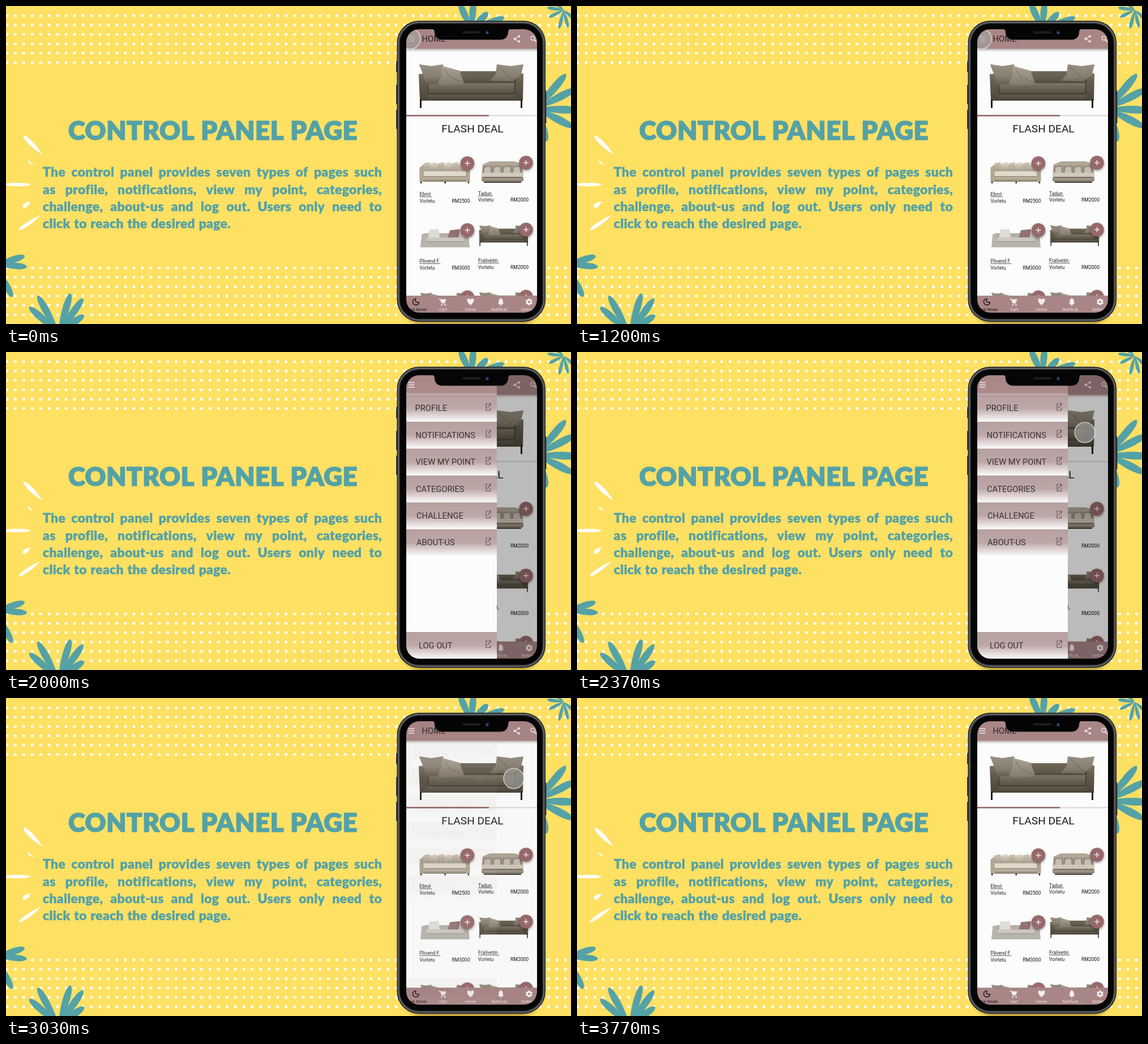
Write an HTML page with a canvas that moves like this. It is 998 by 561 pixels and loops after 3.81 s.

```html
<!DOCTYPE html>
<html lang="en">
<head>
<meta charset="utf-8">
<title>Control panel page</title>
<style>
html, body { margin: 0; width: 100%; height: 100%; overflow: hidden; background: #fee063; }
canvas { display: block; width: 998px; height: 561px; }
</style>
</head>
<body>
<canvas id="stage" width="998" height="561"></canvas>
<script>
const W = 998, H = 561, LOOP = 3810;
const SCREEN = { x: 707, y: 41, w: 231, h: 500, r: 23 };
const TEAL = '#54a2a6', MAUVE = '#a98686', PLUM = '#98696b';
const view = document.getElementById('stage').getContext('2d');

function layer(paint) {
  const c = document.createElement('canvas');
  c.width = W;
  c.height = H;
  paint(c.getContext('2d'));
  return c;
}

function box(g, x, y, w, h, r, fill) {
  g.beginPath();
  g.roundRect(x, y, w, h, r);
  g.fillStyle = fill;
  g.fill();
}

function disc(g, x, y, r, fill) {
  g.beginPath();
  g.arc(x, y, r, 0, Math.PI * 2);
  g.fillStyle = fill;
  g.fill();
}

function poly(g, fill, ...p) {
  g.beginPath();
  for (let i = 0; i < p.length; i += 2) g.lineTo(p[i], p[i + 1]);
  g.closePath();
  g.fillStyle = g.strokeStyle = fill;
  g.lineWidth = 2;
  g.lineJoin = 'round';
  g.fill();
  g.stroke();
}

function line(g, color, width, ...p) {
  g.beginPath();
  for (let i = 0; i < p.length; i += 2) g.lineTo(p[i], p[i + 1]);
  g.strokeStyle = color;
  g.lineWidth = width;
  g.stroke();
}

function label(g, str, x, y, font, color, align = 'left') {
  g.font = font;
  g.textAlign = align;
  g.fillStyle = color;
  g.fillText(str, x, y);
}

function fade(g, y0, y1, ...stops) {
  const grad = g.createLinearGradient(0, y0, 0, y1);
  for (let i = 0; i < stops.length; i += 2) grad.addColorStop(stops[i], stops[i + 1]);
  return grad;
}

// Thin at the base, round at the tip.
function petal(g, fill, x, y, tipX, tipY, w) {
  const len = Math.hypot(tipX - x, tipY - y);
  g.save();
  g.translate(x, y);
  g.rotate(Math.atan2(tipY - y, tipX - x));
  g.beginPath();
  g.moveTo(0, 0);
  g.bezierCurveTo(len * .4, -w * .7, len * .96, -w * .75, len, 0);
  g.bezierCurveTo(len * .96, w * .75, len * .4, w * .7, 0, 0);
  g.fillStyle = fill;
  g.fill();
  g.restore();
}

function flower(g, x, y, w, ...tips) {
  for (let i = 0; i < tips.length; i += 2) petal(g, TEAL, x, y, tips[i], tips[i + 1], w);
}

function roundText(g, str, x, y, font, edge) {
  label(g, str, x, y, font, TEAL);
  g.strokeStyle = TEAL;
  g.lineWidth = edge;
  g.lineJoin = 'round';
  g.strokeText(str, x, y);
}

function justify(g, str, x, y, width, font) {
  const words = str.split(' ');
  g.font = font;
  const sizes = words.map(w => g.measureText(w).width);
  const gap = (width - sizes.reduce((a, b) => a + b)) / (words.length - 1);
  words.forEach((w, i) => {
    roundText(g, w, x, y, font, .4);
    x += sizes[i] + gap;
  });
}

function drawBackdrop(g) {
  g.fillStyle = '#fee063';
  g.fillRect(0, 0, W, H);
  for (const top of [17, 462])
    for (let row = 0; row < 6; row++)
      for (let x = 1.5; x < W; x += 14.95) disc(g, x, top + row * 16.5, 2.6, '#fffdf4');

  flower(g, -16, 456, 10.5, 33, 441, 37, 460);
  flower(g, -12, 468, 10.5, 11, 513);
  flower(g, 93, 577, 11.5, 41, 531, 56, 511, 114, 507, 136, 516, 138, 545);
  flower(g, 985, 7, 5.5, 956, 3, 959, 20, 977, 40, 993, 38, 1006, 25, 968, -8);
  flower(g, 822, 42, 11, 801, -5, 826, -8, 851, 11, 880, 20);
  flower(g, 938, 181, 12.5, 989, 120, 1006, 146, 1012, 184, 1002, 214, 955, 239);

  petal(g, '#fff', 64, 262, 31, 229, 7);
  petal(g, '#fff', 48, 281, 38, 273, 2.5);
  petal(g, '#fff', -16, 315, 43, 315, 5.5);
  petal(g, '#fff', 43, 345, 30, 355, 7);
  petal(g, '#fff', 61, 369, 23, 395, 6);

  g.letterSpacing = '0.6px';
  roundText(g, 'CONTROL PANEL PAGE', 110, 236, '900 45.4px Lato, sans-serif', 1.6);
  g.letterSpacing = '0.3px';
  const font = '900 22.9px Lato, sans-serif';
  justify(g, 'The control panel provides seven types of pages such', 65, 301, 599, font);
  justify(g, 'as profile, notifications, view my point, categories,', 65, 332, 599, font);
  justify(g, 'challenge, about-us and log out. Users only need to', 65, 362, 599, font);
  justify(g, 'click to reach the desired page.', 65, 392, 332, font);
}

function drawPhone(g) {
  g.save();
  g.shadowColor = 'rgba(70,50,0,.45)';
  g.shadowBlur = 6;
  g.shadowOffsetY = 4;
  box(g, 699, 44, 246, 513, 36, '#222');
  g.restore();
  for (const [y, h] of [[97, 20], [139, 34], [183, 34]]) box(g, 689, y, 4, h, 1, '#3b3b3d');
  box(g, 951, 149, 3.5, 58, 1, '#3b3b3d');
  box(g, 690.5, 26, 262.5, 531, 39, '#1f2022');
  box(g, 692.3, 27.8, 258.9, 527.4, 37.2, '#77787b');
  box(g, 693.7, 29.2, 256.1, 524.6, 35.8, '#3c3d40');
  box(g, 695.8, 31.3, 251.9, 520.4, 33.7, '#050506');
}

function drawNotch(g) {
  g.beginPath();
  g.moveTo(750, 40);
  g.quadraticCurveTo(757, 40, 757, 46);
  g.arcTo(757, 59.5, 772, 59.5, 13);
  g.arcTo(887, 59.5, 887, 46, 13);
  g.lineTo(887, 46);
  g.quadraticCurveTo(887, 40, 894, 40);
  g.closePath();
  g.fillStyle = '#050506';
  g.fill();
  box(g, 806, 44.5, 32, 4, 2, '#1d1e20');
  disc(g, 850, 47, 3.4, '#15253c');
  disc(g, 850, 47, 1.6, '#37629a');
}

// Sofas are drawn on a 186 x 80 grid and scaled into place.
function sofa(g, x, y, w, h, paint) {
  g.save();
  g.translate(x, y);
  g.scale(w / 186, h / 80);
  paint(g);
  g.restore();
}

function darkSofa(g) {
  const cushion = fade(g, 3, 38, 0, '#978f81', .6, '#857d6f', 1, '#625b4e');
  box(g, 12, 14, 162, 28, 3, fade(g, 14, 40, 0, '#6f6859', .6, '#5f594b', 1, '#3f3a30'));
  box(g, 15, 35, 157, 20, 3, fade(g, 35, 55, 0, '#7d7566', .4, '#6d6657', 1, '#554f42'));
  box(g, 3, 53, 181, 13, 2, fade(g, 53, 66, 0, '#38342b', .25, '#625b4d', 1, '#474236'));
  const arm = fade(g, 19, 65, 0, '#7a7263', .3, '#645d4f', 1, '#4c463a');
  poly(g, arm, 2, 20, 13, 19, 17, 64, 4, 65);
  poly(g, arm, 173, 18, 184, 19, 183, 65, 170, 64);
  line(g, '#3d382e', 1.5, 16, 20, 18, 54);
  line(g, '#3d382e', 1.5, 171, 20, 169, 54);
  for (const lx of [3, 180]) g.fillStyle = '#211e1a', g.fillRect(lx, 64, 3, 15);
  poly(g, cushion, 3, 3, 23, 6, 43, 3, 46, 22, 40, 35, 15, 37, 10, 20);
  poly(g, fade(g, 6, 38, 0, '#aaa294', 1, '#837b6d'), 43, 6, 72, 14, 80, 36, 42, 38, 36, 35, 42, 22);
  line(g, '#766e60', 1, 46, 10, 56, 24, 78, 34);
  poly(g, cushion, 139, 3, 163, 6, 184, 3, 180, 19, 166, 31, 128, 30, 137, 20);
  line(g, '#6c6556', 1, 142, 6, 153, 17, 166, 29);
}

function creamSofa(g) {
  box(g, 8, 14, 170, 34, 4, '#aba08f');
  for (let i = 0; i < 6; i++) {
    const x = 16 + i * 26;
    const tone = fade(g, 4, 38, 0, i % 2 ? '#ded7ca' : '#cdc4b4', 1, '#a69b89');
    poly(g, tone, x, 8, x + 21, 4, x + 25, 36, x - 3, 38);
  }
  box(g, 8, 36, 170, 20, 4, '#e0d9cc');
  box(g, 4, 54, 178, 20, 3, fade(g, 54, 74, 0, '#897d6b', .3, '#c3b8a7', 1, '#877b69'));
  box(g, 1, 20, 15, 54, 4, '#b1a593');
  box(g, 170, 20, 15, 54, 4, '#b1a593');
  for (const x of [4, 92, 177]) g.fillStyle = '#3b352d', g.fillRect(x, 73, 5, 7);
}

function loungeSofa(g) {
  poly(g, '#b1a797', 10, 14, 40, 3, 146, 3, 176, 14, 180, 52, 6, 52);
  for (let i = 0; i < 4; i++) {
    const x = 13 + i * 41;
    poly(g, '#91877a', x, 20, x + 34, 18, x + 37, 42, x - 2, 44);
    poly(g, '#c6beb0', x + 6, 24, x + 28, 22, x + 30, 42, x + 3, 43);
  }
  box(g, 5, 42, 176, 18, 7, '#d0c8bb');
  box(g, 4, 57, 178, 16, 8, fade(g, 57, 73, 0, '#5f5546', .4, '#aa9f8e', 1, '#7d7363'));
  box(g, 14, 73, 158, 5, 2, '#4a4339');
}

function greySofa(g) {
  box(g, 14, 18, 158, 34, 4, '#b3aea6');
  poly(g, '#dedcd7', 34, 4, 68, 2, 72, 38, 30, 39);
  poly(g, '#c2bdb5', 142, 4, 166, 7, 168, 36, 138, 38);
  poly(g, '#8d6c6c', 112, 7, 148, 3, 143, 36, 104, 38);
  for (let i = 0; i < 3; i++) line(g, '#b59b9b', 1.5, 114 + i * 10, 8, 112 + i * 10, 35);
  box(g, 16, 36, 154, 18, 4, '#cbc7c0');
  poly(g, '#b8b3ab', 6, 22, 20, 22, 22, 52, 164, 52, 166, 22, 180, 22, 185, 76, 1, 76);
  line(g, '#928d85', 1.5, 22, 54, 164, 54);
}

function plus(g, x, y) {
  g.save();
  g.shadowColor = 'rgba(0,0,0,.4)';
  g.shadowBlur = 4;
  g.shadowOffsetY = 2;
  disc(g, x, y, 12.2, PLUM);
  g.restore();
  line(g, '#f3e9e9', 1.5, x - 4.5, y, x + 4.5, y);
  line(g, '#f3e9e9', 1.5, x, y - 4.5, x, y + 4.5);
}

function product(g, name, x, y, price) {
  const font = '8.6px Roboto, sans-serif';
  label(g, name, x, y, font, '#202020');
  line(g, '#333', .8, x, y + 1.6, x + g.measureText(name + ' ').width, y + 1.6);
  label(g, 'Vorletu', x, y + 11.5, font, '#202020');
  label(g, price, x + 89, y + 11.8, font, '#111', 'right');
}

function drawHeaderIcons(g) {
  const c = '#f1e6e6';
  line(g, c, 1.3, 906, 53.5, 898.5, 58, 906, 62.5);
  for (const [x, y] of [[906, 53.5], [898.5, 58], [906, 62.5]]) disc(g, x, y, 2.1, c);
  g.beginPath();
  g.arc(930.5, 56.8, 3.5, 0, 7);
  g.strokeStyle = c;
  g.lineWidth = 1.5;
  g.stroke();
  line(g, c, 1.8, 933, 59.5, 937, 63.5);
}

function drawTabs(g) {
  const c = '#f6eeee', font = '7.3px Roboto, sans-serif';
  g.fillStyle = MAUVE;
  g.fillRect(707, 511, 231, 30);

  g.beginPath();
  g.arc(724, 522, 5.6, .1, 4.7);
  g.quadraticCurveTo(721, 524, 729.6, 522.5);
  g.strokeStyle = '#1d1718';
  g.lineWidth = 1.5;
  g.stroke();

  line(g, c, 1.4, 764.5, 517, 767, 517, 770, 524, 776, 524);
  poly(g, c, 768.5, 518.5, 776.5, 518.5, 774.5, 522, 770.3, 522);
  disc(g, 769.8, 527.3, 1.4, c);
  disc(g, 775.5, 527.3, 1.4, c);

  g.beginPath();
  g.moveTo(820.5, 528);
  g.bezierCurveTo(810, 519.5, 815.5, 512.5, 820.5, 518);
  g.bezierCurveTo(825.5, 512.5, 831, 519.5, 820.5, 528);
  g.fillStyle = c;
  g.fill();

  g.beginPath();
  g.moveTo(869, 526);
  g.quadraticCurveTo(870.5, 525, 870.5, 520);
  g.arc(874, 520, 3.6, Math.PI, 0);
  g.quadraticCurveTo(877.6, 525, 879.2, 526);
  g.closePath();
  g.fill();
  disc(g, 874, 516, 1.1, c);
  disc(g, 874, 527.2, 1.4, c);

  for (let i = 0; i < 3; i++) {
    const a = i * Math.PI / 3, dx = Math.sin(a) * 6, dy = Math.cos(a) * 6;
    line(g, c, 3.2, 924 - dx, 522 - dy, 924 + dx, 522 + dy);
  }
  disc(g, 924, 522, 4.5, c);
  disc(g, 924, 522, 2, MAUVE);

  label(g, 'Dark Mode', 743, 537.5, font, '#1d1718', 'right');
  label(g, 'Cart', 772, 537.5, font, '#efe4e4', 'center');
  label(g, 'Home', 820.5, 537.5, font, '#efe4e4', 'center');
  label(g, 'Notificat...', 874, 537.5, font, '#efe4e4', 'center');
  label(g, 'Settings', 910, 537.5, font, '#efe4e4');
}

function drawHome(g) {
  g.fillStyle = '#fbfcfb';
  g.fillRect(707, 41, 231, 500);
  g.fillStyle = fade(g, 75, 81, 0, 'rgba(60,40,40,.35)', 1, 'rgba(60,40,40,0)');
  g.fillRect(707, 75, 231, 6);
  g.fillStyle = MAUVE;
  g.fillRect(707, 41, 231, 34.5);
  label(g, 'HOME', 734.5, 63.2, '14.7px Roboto, sans-serif', '#2c2425');
  drawHeaderIcons(g);

  sofa(g, 728, 101, 187, 80, darkSofa);
  g.fillStyle = '#e2dfdf';
  g.fillRect(707, 192, 231, 2.6);
  g.fillStyle = PLUM;
  g.fillRect(707, 192, 146, 2.6);
  label(g, 'FLASH DEAL', 824, 223, '19.1px Roboto, sans-serif', '#1a1a1a', 'center');

  sofa(g, 730, 274, 90, 39, creamSofa);
  sofa(g, 838, 273, 78, 40, loungeSofa);
  sofa(g, 732, 393, 87, 34, greySofa);
  sofa(g, 835, 386, 88, 38, darkSofa);
  sofa(g, 731, 505, 88, 38, darkSofa);
  sofa(g, 835, 504, 88, 38, darkSofa);
  for (const x of [815, 918.5])
    for (const y of [277.5, 395.5, 514]) plus(g, x, x > 900 ? y - 1 : y);

  product(g, 'Ebrol', 730.5, 335, 'RM2500');
  product(g, 'Tadun', 834, 333.5, 'RM2000');
  product(g, 'Plivend F', 730.5, 453, 'RM3000');
  product(g, 'Fralivetin', 834, 452, 'RM2000');
  drawTabs(g);
}

function menuRow(g, str, x, top) {
  g.fillStyle = fade(g, top, top + 47, 0, '#b79f9f', .5, '#bda7a7', .72, '#d9cccc', 1, '#fcfbfb');
  g.fillRect(707, top, 160, 47.5);
  label(g, str, x, top + 28.7, '14.7px Roboto, sans-serif', '#3c3334');
  const y = top + 21.5, c = '#66585a';
  line(g, c, 1.2, 851, y - 6, 848, y - 6, 848, y + 6, 855.5, y + 6, 855.5, y + 1.5);
  line(g, c, 1.2, 852.5, y - 6.3, 855.8, y - 6.3, 855.8, y - 2);
  line(g, c, 1.2, 855.5, y - 6, 850.5, y + 2);
}

function drawMenu(g) {
  g.fillStyle = '#fbfcfb';
  g.fillRect(707, 41, 160, 500);
  const rows = [['PROFILE', 722.5], ['NOTIFICATIONS', 723.5], ['VIEW MY POINT', 723.5],
    ['CATEGORIES', 724], ['CHALLENGE', 725], ['ABOUT-US', 725]];
  rows.forEach(([str, x], i) => menuRow(g, str, x, 75.5 + i * 47.45));
  menuRow(g, 'LOG OUT', 729, 494);
  g.fillStyle = fade(g, 41, 82, 0, MAUVE, .75, '#ac8b8b', 1, 'rgba(183,159,159,0)');
  g.fillRect(707, 41, 160, 41);
}

const backdrop = layer(g => { drawBackdrop(g); drawPhone(g); });
const home = layer(drawHome);
const menu = layer(drawMenu);

const ramp = (t, from, to) => Math.min(1, Math.max(0, (t - from) / (to - from)));

function touch(g, x, y, alpha) {
  if (!alpha) return;
  g.globalAlpha = alpha;
  disc(g, x, y, 18, 'rgba(160,160,157,.68)');
  g.strokeStyle = 'rgba(240,240,238,.85)';
  g.lineWidth = 1.2;
  g.stroke();
  g.globalAlpha = 1;
}

function draw(t) {
  const g = view;
  const open = ramp(t, 1200, 1430) - ramp(t, 2765, 3048);
  g.drawImage(backdrop, 0, 0);
  g.save();
  g.beginPath();
  g.roundRect(SCREEN.x, SCREEN.y, SCREEN.w, SCREEN.h, SCREEN.r);
  g.clip();
  g.drawImage(home, 0, 0);
  g.fillStyle = `rgba(0,0,0,${.26 * open})`;
  g.fillRect(SCREEN.x, SCREEN.y, SCREEN.w, SCREEN.h);
  g.globalAlpha = open;
  g.drawImage(menu, 0, 0);
  g.globalAlpha = 1;
  for (const y of [54, 58, 62]) line(g, '#f3e9e9', 1.5, 710.5, y, 721.5, y);
  touch(g, 714, 58, 1 - ramp(t, 1640, 1700));
  touch(g, 897, 142, ramp(t, 2190, 2250) - ramp(t, 3180, 3240));
  g.restore();
  drawNotch(g);
}

let start;
function tick(now) {
  start ??= now;
  draw((now - start) % LOOP);
  requestAnimationFrame(tick);
}
draw(0);
requestAnimationFrame(tick);
</script>
</body>
</html>
```
